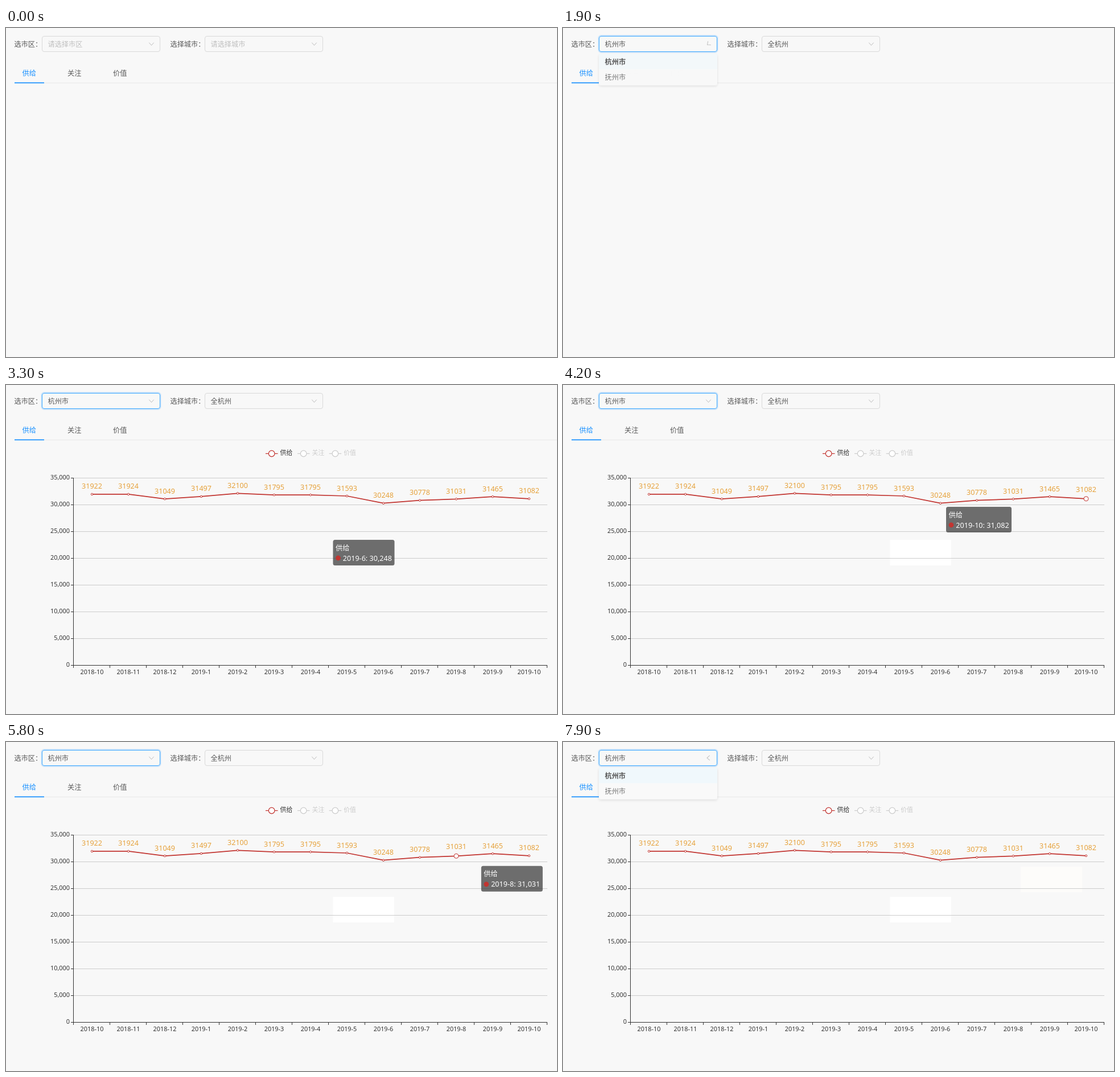
An HTML page that plays this animation: 968x578 px, repeating every 8000 ms.

```html
<!DOCTYPE html>
<html lang="zh-CN">
<head>
<meta charset="utf-8">
<style>
html, body { margin: 0; width: 100%; height: 100%; overflow: hidden; background: #f8f8f8; }
svg { display: block; font-family: "Noto Sans", "Noto Sans CJK SC", "Noto Sans CJK", sans-serif; }
</style>
</head>
<body>
<svg id="stage" width="968" height="578" viewBox="0 0 968 578"></svg>
<script>
const LOOP = 8000, FRAME = 100;
const BLUE = '#1890ff', HOVER = '#40a9ff', RED = '#c23531', INK = '#595959';
const LEFT = 119, RIGHT = 951, BASE = 492, STEP = 64;
const values = [31922, 31924, 31049, 31497, 32100, 31795, 31795, 31593, 30248, 30778, 31031, 31465, 31082];
const months = values.map((_, i) => i < 3 ? `2018-${10 + i}` : `2019-${i - 2}`);
const px = i => LEFT + STEP * (i + .5);
const py = v => BASE - v * 329 / 35000;

const text = (x, cy, str, size, fill, extra = '') =>
  `<text x="${x}" y="${cy + size * .37}" font-size="${size}" fill="${fill}" ${extra}>${str}</text>`;
const line = (x1, y1, x2, y2, color, width = 1) =>
  `<path d="M${x1} ${y1}L${x2} ${y2}" stroke="${color}" stroke-width="${width}"/>`;
const rect = (x, y, w, h, fill, extra = '') =>
  `<rect x="${x}" y="${y}" width="${w}" height="${h}" fill="${fill}" ${extra}/>`;

function select(id, x, label, labelX) {
  return text(labelX, 28, label, 12.2, INK) +
    rect(x - .8, 13.2, 209.6, 29.6, 'none', `id="${id}Glow" rx="4.5" stroke="${BLUE}" stroke-width="1.7" opacity="0"`) +
    rect(x + .5, 14.5, 207, 27, '#f8f8f8', `id="${id}Box" rx="3.5"`) +
    text(x + 10.5, 28, '', 12.2, INK, `id="${id}Text"`) +
    `<path id="${id}Arrow" d="M-4.2 -2.3L0 2.5L4.2 -2.3" fill="none" stroke="#bdbdbd"/>`;
}

function legend(x, name, color, ink) {
  return line(x, 120.5, x + 21.5, 120.5, color, 1.2) +
    `<circle cx="${x + 10.7}" cy="120.5" r="5.3" fill="#fff" stroke="${color}" stroke-width="1.2"/>` +
    text(x + 25.5, 119, name, 10.9, ink);
}

function axes() {
  let s = '';
  for (let k = 0; k <= 7; k++) {
    const y = BASE - 47 * k + .5;
    if (k) s += line(LEFT, y, RIGHT, y, '#ccc');
    s += line(LEFT - 5, y, LEFT, y, '#333') +
      text(112, y - 1.5, (k * 5000).toLocaleString('en-US'), 10.9, '#333', 'text-anchor="end"');
  }
  for (let k = 0; k <= 13; k++) {
    const x = LEFT + STEP * k - .5;
    s += line(x, BASE, x, BASE + 5, '#333');
  }
  months.forEach((m, i) => s += text(px(i), 503.5, m, 10.9, '#333', 'text-anchor="middle"'));
  return s + line(LEFT - .5, 163, LEFT - .5, BASE + 1, '#333') +
    line(LEFT, BASE + .5, RIGHT, BASE + .5, '#333');
}

const points = values.map((v, i) => `${px(i)},${py(v).toFixed(1)}`).join(' ');
const $ = id => document.getElementById(id);

$('stage').innerHTML =
  '<defs><clipPath id="reveal"><rect id="revealRect" x="119" y="140" height="360"/></clipPath>' +
  '<filter id="shadow" x="-10%" y="-20%" width="120%" height="150%">' +
  '<feDropShadow dx="0" dy="1.7" stdDeviation="2.2" flood-color="#000" flood-opacity=".11"/></filter></defs>' +
  rect(0, 0, 968, 578, '#f8f8f8') +
  select('area', 63, '选市区：', 14.5) + select('city', 349, '选择城市：', 288.5) +
  line(15, 96.5, 968, 96.5, '#e8e8e8') + rect(15, 95.5, 52, 1.7, BLUE) +
  text(28.5, 79, '供给', 12.2, BLUE) + text(108, 79, '关注', 12.2, INK) + text(188, 79, '价值', 12.2, INK) +
  '<g id="chart">' +
  rect(574.5, 272, 107.5, 45, '#fff', 'id="patchA"') + rect(804, 219, 108, 45, '#fdfcfa', 'id="patchB"') +
  legend(456, '供给', RED, '#333') + legend(512, '关注', '#ccc', '#ccc') + legend(567.7, '价值', '#ccc', '#ccc') +
  axes() +
  `<polyline points="${points}" fill="none" stroke="${RED}" stroke-width="1.7" stroke-linejoin="bevel" clip-path="url(#reveal)"/>` +
  values.map((v, i) =>
    `<circle id="dot${i}" cx="${px(i)}" cy="${py(v)}" fill="#fff" stroke="${RED}"/>` +
    text(px(i), 0, v, 12.6, '#e6a23c', `id="label${i}" text-anchor="middle"`)).join('') +
  '</g>' +
  '<g id="tip">' + rect(0, 0, 108, 45, '#323232', 'id="tipBox" rx="3.5" fill-opacity=".7"') +
  text(4.5, 14, '供给', 12.2, '#fff', 'font-weight="500"') +
  `<circle cx="9" cy="32" r="4.4" fill="${RED}"/>` +
  text(17.3, 32, '', 12.6, '#fff', 'id="tipText" font-weight="500"') + '</g>' +
  '<g id="menu">' + rect(63, 45.5, 208, 55, '#f9f9f9', 'rx="3.5" filter="url(#shadow)"') +
  rect(63, 45.5, 208, 27, '#eef8fd', 'id="active"') +
  text(73.5, 59.3, '杭州市', 12.2, INK, 'id="first"') + text(73.5, 86.5, '抚州市', 12.2, '#777') + '</g>';

const clamp = v => Math.max(0, Math.min(1, v));
const ramp = (t, start, span) => clamp((t - start) / span);
const between = (t, a, b) => t >= a && t < b;
const easeOut = (p, n) => 1 - (1 - p) ** n;
const set = (id, attrs) => { for (const k in attrs) $(id).setAttribute(k, attrs[k]); };
const show = (id, on) => set(id, { visibility: on ? 'visible' : 'hidden' });

function mix(a, b, p) {
  const part = (hex, i) => parseInt(hex.slice(i, i + 2), 16);
  return `rgb(${[1, 3, 5].map(i => Math.round(part(a, i) + (part(b, i) - part(a, i)) * p))})`;
}

// Opening and closing times of the area menu
const menus = [{ open: 760, close: 1760 }, { open: 7360, close: 7810 }];

function drawSelects(t) {
  const chosen = t >= 1800;
  $('areaText').textContent = chosen ? '杭州市' : '请选择市区';
  $('cityText').textContent = chosen ? '全杭州' : '请选择城市';
  for (const id of ['areaText', 'cityText']) set(id, { fill: chosen ? INK : '#bfbfbf' });
  set('areaBox', { stroke: mix('#d9d9d9', HOVER, ramp(t, 550, 250)) });
  set('areaGlow', { opacity: .2 * ramp(t, 750, 250) });
  set('cityBox', { stroke: mix('#d9d9d9', HOVER, ramp(t, 2300, 300) - ramp(t, 2770, 300)) });

  const m = t < 5000 ? menus[0] : menus[1];
  const turn = easeOut(ramp(t, m.open, 300), 2) - easeOut(ramp(t, m.close, 300), 2);
  set('areaArrow', { transform: `translate(255.5 28) rotate(${180 * turn})` });
  set('cityArrow', { transform: 'translate(541.5 28)' });

  const leave = ramp(t, m.close, 200);
  const shown = easeOut(ramp(t, m.open, 200), 5) * (1 - leave ** 14);
  show('menu', shown > 0);
  set('menu', { opacity: shown, transform: `translate(0 45.5) scale(1 ${.8 + .2 * shown}) translate(0 -45.5)` });
  set('active', { opacity: 1 - leave * leave });
  set('first', { 'font-weight': chosen ? 700 : 400 });
}

function drawChart(t) {
  const grow = ramp(t, 1857, 1000);
  $('chart').style.display = t >= 2000 ? '' : 'none';
  set('revealRect', { width: (RIGHT - LEFT) * grow });
  show('patchA', t >= 3400);
  show('patchB', t >= 6700);
  values.forEach((v, i) => {
    let hot = 0;
    if (i === 12 && between(t, 4200, 5000)) hot = 1;
    if (i === 10 && between(t, 5700, 6600)) hot = t < 6500 ? 1 : .25;
    set('dot' + i, { r: 1.7 * grow + 2.3 * hot });
    set('label' + i, { y: py(v) - 9.5 - (hot === 1 ? 2.8 : 0) });
  });
}

// Each tooltip appears at its old place and glides to the new one
const tips = [
  { on: 3300, off: 3400, item: 8, from: [574.5, 272], to: [673, 214] },
  { on: 4200, off: 5200, item: 12, from: [673, 214], to: [934, 214] },
  { on: 5700, off: 6700, item: 10, from: [934, 214], to: [804, 219] }
];

function drawTip(t) {
  const tip = tips.find(d => between(t, d.on, d.off));
  show('tip', !!tip);
  if (!tip) return;
  const p = easeOut(ramp(t, tip.on, 400), 5);
  const [x, y] = tip.from.map((a, i) => a + (tip.to[i] - a) * p);
  set('tip', { transform: `translate(${x} ${y})` });
  set('tipBox', { width: tip.item === 12 ? 115 : 108 });
  $('tipText').textContent = `${months[tip.item]}: ${values[tip.item].toLocaleString('en-US')}`;
}

function render(now) {
  const t = Math.floor(now % LOOP / FRAME) * FRAME;
  drawSelects(t);
  drawChart(t);
  drawTip(t);
}

const start = performance.now();
function tick() {
  render(performance.now() - start);
  requestAnimationFrame(tick);
}
tick();
</script>
</body>
</html>
```
